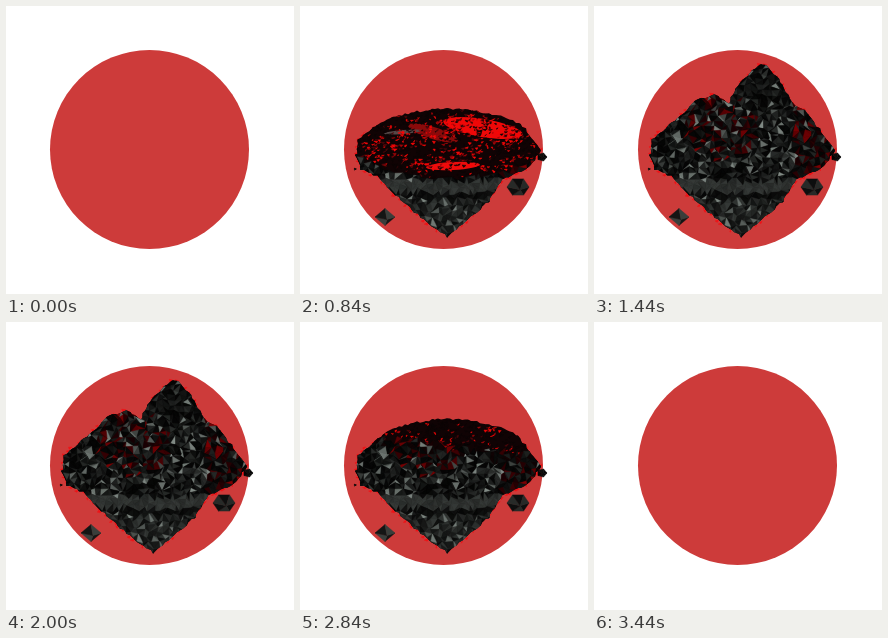
Recreate the animation shown at these times as an HTML page with a canvas. Size 288 px wide and 288 px high, loop 4 s.

```html
<!DOCTYPE html>
<html lang="en">
<head>
<meta charset="utf-8">
<title>Growing rock</title>
<style>
html, body { margin: 0; width: 100%; height: 100%; overflow: hidden; background: #fff; }
canvas { display: block; width: 100vw; height: 100vh; }
</style>
</head>
<body>
<canvas width="288" height="288"></canvas>
<script>
const canvas = document.querySelector('canvas');
const ctx = canvas.getContext('2d');
const LOOP = 4000, STEP = 40, MIDDLE = 139;

let seed = 7;
function rnd(a = 0, b = 1) {
  seed = (seed + 0x6D2B79F5) | 0;
  let n = Math.imul(seed ^ (seed >>> 15), 1 | seed);
  n = (n + Math.imul(n ^ (n >>> 7), 61 | n)) ^ n;
  return a + (b - a) * (((n ^ (n >>> 14)) >>> 0) / 4294967296);
}
const clamp = v => Math.min(1, Math.max(0, v));
const arc = u => Math.sqrt(Math.max(0, 1 - u * u));
const grey = v => `rgb(${v * .93 | 0},${v | 0},${v * .96 | 0})`;
const list = (n, make) => Array.from({ length: n }, (_, i) => make(i));

function shape(points) {
  const path = new Path2D();
  for (const [x, y] of points) path.lineTo(x, y);
  path.closePath();
  return path;
}

function paint(path, color) {
  ctx.fillStyle = ctx.strokeStyle = color;
  ctx.lineWidth = .5;
  ctx.fill(path);
  ctx.stroke(path);
}

function shard(x, y, w, h) {
  return shape([[x - w / 2, y + rnd(-h, h)], [x + w / 2, y - h / 2], [x + rnd(-1, 1), y + h]]);
}

// Splits every edge into short pieces and shakes them
function roughen(points, amount) {
  return points.flatMap(([x, y], i) => {
    const [p, q] = points[(i + 1) % points.length];
    const n = Math.ceil(Math.hypot(p - x, q - y) / 4);
    return list(n, j => [x + (p - x) * j / n + rnd(-amount, amount),
                         y + (q - y) * j / n + rnd(-amount, amount)]);
  });
}

const outline = roughen([
  [56, 150], [58, 134], [78, 117], [104, 93], [121, 89], [135, 97], [141, 82],
  [158, 64], [170, 58], [185, 72], [199, 98], [211, 104], [223, 120], [241, 145],
  [228, 162], [202, 173], [189, 195], [147, 231], [120, 211], [93, 187], [80, 172], [61, 163]
], 1);
const rock = shape(outline);

const fringe = outline.filter(() => rnd() < .62).map(([x, y]) =>
  shard(x + rnd(-2, 1), y + rnd(-1, 2), rnd(1, 5), rnd(1, 2.5)));

function facetColor(x, y) {
  const r = rnd(), q = rnd();
  const depth = y - 171 - 4 * arc((x - 147) / 70);
  if (depth > 0 && depth < 12) return grey(40 + 18 * r);
  if (depth >= 12 && depth < 17) return grey(6 + 18 * r);
  if (depth > 0) return grey(r < .13 ? 70 + 70 * q : 10 + 46 * q);
  const glow = Math.hypot((x - 128) / 36, (y - 122) / 34) < 1 || x > 200;
  if (glow && r < .3) return `rgb(${20 + 110 * q * q | 0},0,3)`;
  const bright = y < 112 ? .06 : x > 200 ? .04 : .13;
  return grey(r > 1 - bright ? 55 + 85 * q : 5 + 40 * q * q);
}

// Jittered mesh of small triangles
const COLS = 38, ROWS = 35, CELL = 5.2;
const mesh = list(ROWS + 1, j => list(COLS + 1, i =>
  [49 + i * CELL + rnd(-2.3, 2.3), 53 + j * CELL + rnd(-2.3, 2.3)]));
const facets = [];
for (let j = 0; j < ROWS; j++) for (let i = 0; i < COLS; i++) {
  const a = mesh[j][i], b = mesh[j][i + 1], c = mesh[j + 1][i + 1], d = mesh[j + 1][i];
  for (const tri of rnd() < .5 ? [[a, b, c], [a, c, d]] : [[a, b, d], [b, c, d]]) {
    const x = (tri[0][0] + tri[1][0] + tri[2][0]) / 3;
    const y = (tri[0][1] + tri[1][1] + tri[2][1]) / 3;
    facets.push({ x, y, shift: rnd(-9, 9), path: shape(tri), color: facetColor(x, y) });
  }
}

const specks = list(3400, () => {
  const x = rnd(50, 248), y = rnd(55, 218);
  return { x, y, pick: rnd(), tone: rnd(), edge: rnd(.8, 1), path: shard(x, y, rnd(1, 4), rnd(.5, 1.6)) };
});
const ragged = list(70, () => rnd(-1.2, 1.2));

// A loose stone: a fan of differently lit sides
function gem(x, y, r, sides, light) {
  const corner = i => [x + r * Math.cos(i * 2 * Math.PI / sides), y + r * .85 * Math.sin(i * 2 * Math.PI / sides)];
  return list(sides, i => ({
    path: shape([[x + r * .2, y + r * .25], corner(i), corner(i + 1)]),
    color: grey(light * (.35 + .65 * (i % 2)))
  }));
}
const stones = [
  { from: .7, sides: gem(85, 211, 10, 4, 62) },
  { from: .88, sides: gem(218, 181, 11, 6, 42) },
  { from: .88, sides: gem(242, 151, 5, 5, 14) },
  { from: .88, sides: gem(55, 163, 1.3, 3, 20) }
];

function streak({ cx, cy, k }, x, y, rx, ry, turn, color) {
  ctx.fillStyle = color;
  ctx.beginPath();
  ctx.ellipse(cx + x * k, cy + y * k, rx * k, ry * k, turn, 0, 7);
  ctx.fill();
}

function drawInside(cut, heat) {
  paint(rock, '#100304');
  if (heat > .6) {
    streak(cut, 34, -17, 40, 9, .16, '#ee0808');
    streak(cut, -16, -12, 26, 6, .3, '#8a0a0a');
    streak(cut, 4, 21, 27, 4, -.05, '#ee0c0c');
    streak(cut, -46, -13, 19, 2, -.08, '#554747');
  }
  for (const s of specks) {
    const back = cut.back(s.x), front = cut.front(s.x);
    if (s.y < back || s.y > front + 10) continue;
    const u = (s.x - cut.cx) / cut.rx;
    const v = (2 * s.y - back - front) / (front - back + 1) * arc(u);
    const cluster = .36 + .2 * Math.sin(s.x * .07 + s.y * .19) + .16 * Math.sin(s.x * .21 - s.y * .3);
    const red = Math.hypot(u, v) < s.edge && s.pick < cluster * heat * 1.5;
    paint(s.path, !red ? '#0d0405' : s.tone < .5 ? '#f60707' : s.tone < .75 ? '#a00508' : '#4b070a');
  }
}

let shown = -1;
function draw(time) {
  const t = Math.floor(time % LOOP / STEP) * STEP;
  if (t === shown) return;
  shown = t;
  const u = Math.min(t, 3800 - t);
  ctx.clearRect(0, 0, 288, 288);
  ctx.fillStyle = '#cd3b3a';
  ctx.beginPath();
  ctx.arc(143.5, 143.5, 99.5, 0, 7);
  ctx.fill();
  if (u <= 360) return;

  // The cutting plane widens up the cone, then climbs the mountain
  const k = clamp((u - 360) / 480) ** 1.07;
  const climb = clamp((u - 840) / 600);
  const cx = 144 + 5 * k, rx = 95 * k, cy = 231 - (231 - MIDDLE) * k;
  const height = 36 * k + 65 * climb ** 1.5;
  const rise = 33 * k - 138 * climb ** .7;
  const bow = x => arc((x - cx) / rx);
  const cut = {
    cx, cy, rx, k,
    back: x => cy - height * bow(x) ** 1.3,
    front: x => cy + (rise > 0 ? rise * bow(x) : rise) + (climb && (x - 150) * .12)
  };

  const left = k < 1 ? cx - rx : 48, right = k < 1 ? cx + rx : 250;
  const rim = list(Math.ceil((right - left) / 3), i => {
    const x = left + i * 3;
    return [x, cut.back(x) + ragged[i]];
  });

  ctx.save();
  ctx.clip(shape([...rim, [right, cut.back(right)], [right, 240], [left, 240]]));
  for (const f of fringe) paint(f, '#f01014');
  ctx.save();
  ctx.clip(rock);
  drawInside(cut, .25 + .75 * Math.exp(-8 * climb));
  for (const f of facets) {
    if (f.y + f.shift * clamp(climb * 5) * (climb < 1) > cut.front(f.x)) paint(f.path, f.color);
  }
  ctx.restore();
  ctx.restore();
  for (const stone of stones) {
    if (k > stone.from) for (const side of stone.sides) paint(side.path, side.color);
  }
}

const start = performance.now();
function tick() {
  draw(performance.now() - start);
  requestAnimationFrame(tick);
}
tick();
</script>
</body>
</html>
```
